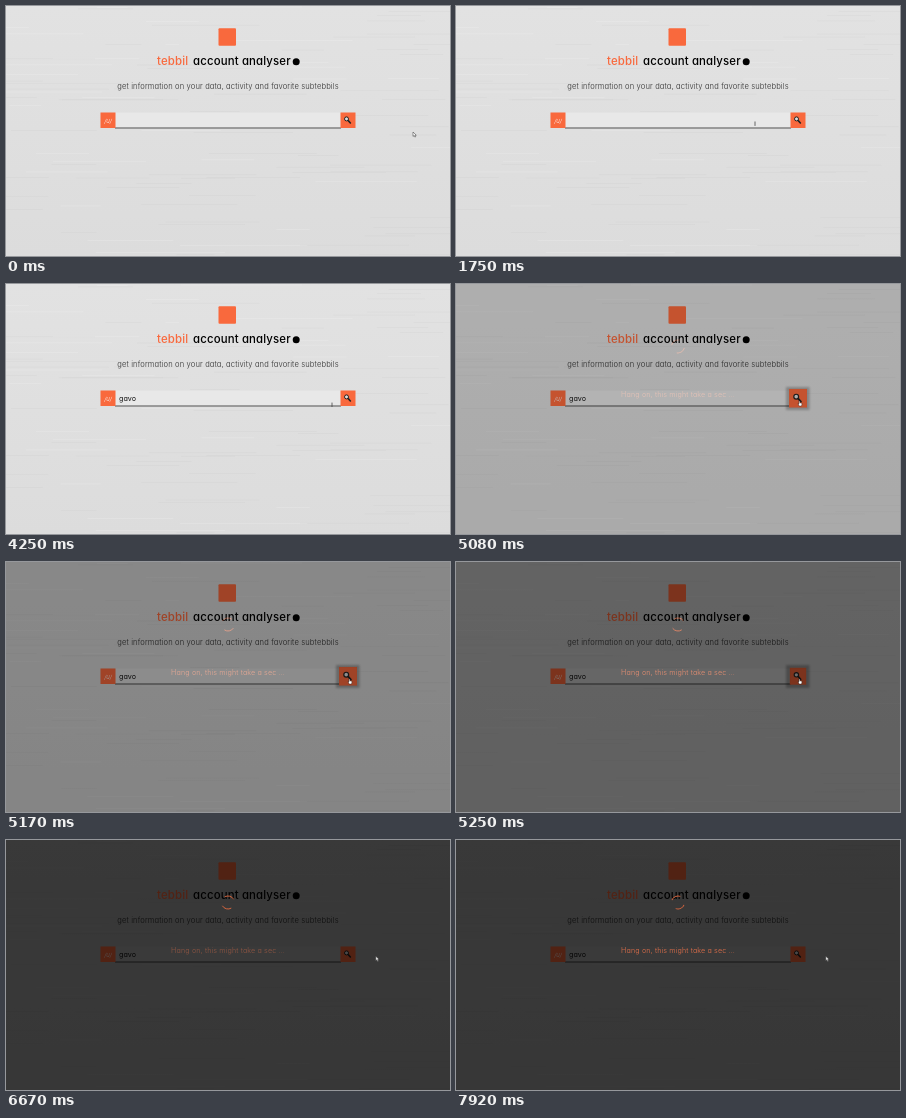
An HTML page for the animation above (8 s loop, 444x250 px).

```html
<!DOCTYPE html>
<html lang="en">
<head>
<meta charset="utf-8">
<title>account analyser</title>
<style>
html, body { margin: 0; width: 100%; height: 100%; overflow: hidden; background: #dfdfdf; }
svg { display: block; width: 100vw; height: 100vh; }
text { font-family: Inter, "Open Sans", sans-serif; font-feature-settings: "cv11"; }
.title { font-size: 11.4px; font-weight: 450; letter-spacing: .15px; }
.sub { font-size: 7.6px; font-weight: 300; letter-spacing: .13px; text-anchor: middle; fill: #333; }
.wait { font-size: 7.2px; font-weight: 300; letter-spacing: .12px; text-anchor: middle; fill: #e8714a; }
.user { font-size: 7.2px; fill: #111; }
.tag { font-size: 6px; font-style: italic; font-weight: 300; text-anchor: middle; fill: #fff; }
.orange { fill: #f9693d; }
</style>
</head>
<body>
<svg viewBox="0 0 444 250">
  <defs>
    <linearGradient id="paper" x2="0" y2="1">
      <stop stop-color="#e2e2e2"/><stop offset="1" stop-color="#dcdcdc"/>
    </linearGradient>
    <filter id="blur" x="-50%" y="-50%" width="200%" height="200%"><feGaussianBlur stdDeviation="1"/></filter>
  </defs>

  <rect width="444" height="250" fill="url(#paper)"/>
  <g id="streaks"></g>

  <text class="title" x="187" y="59.3">account analyser</text>
  <circle cx="290.2" cy="55.8" r="3.5"/>
  <text class="sub" x="222" y="83">get information on your data, activity and favorite subtebbils</text>

  <rect x="109" y="106.5" width="226" height="15" fill="#e8e8e8"/>
  <rect x="109" y="121.5" width="226" height="1" fill="#555"/>
  <text class="user" id="user" x="113" y="116.8"></text>
  <rect id="shadow" x="330" y="103" width="23.5" height="23" filter="url(#blur)"/>

  <g id="marks">
    <rect class="orange" x="212.5" y="22.3" width="17.5" height="17.5" rx="1"/>
    <text class="title orange" x="151" y="59.3">tebbil</text>
    <rect class="orange" x="94.5" y="106.5" width="15" height="15.5"/>
    <text class="tag" x="102" y="116.6">/u/</text>
    <g id="button">
      <rect class="orange" x="334.5" y="106.5" width="15" height="15.5"/>
      <path d="M342 114.4l2.4 2.6" stroke="#222" stroke-width="1.6" stroke-linecap="round"/>
      <circle cx="340.5" cy="112.9" r="2" fill="#ddd" stroke="#222"/>
    </g>
  </g>

  <g id="overlay">
    <rect width="444" height="250" opacity=".75"/>
    <use href="#marks" opacity=".1"/>
    <path id="ring" d="M217.4 57.9a6.5 6.5 0 0 1 9.2 0M226.6 67.1a6.5 6.5 0 0 1-9.2 0" fill="none" stroke="#d9663f" stroke-width=".9"/>
    <text class="wait" id="wait" x="222" y="113">Hang on, this might take a sec ...</text>
  </g>

  <g id="cursor">
    <path id="arrow" d="M0 0v4.4l1.1-.9.8 1.6.8-.4-.8-1.5h1.4z" fill="#fff" stroke="#333" stroke-width=".5"/>
    <path id="beam" d="M0-2.2v4.4" stroke="#444" stroke-width=".8"/>
    <path id="hand" d="M0-1.5v3l-1-.5 1.2 2.5h2.3l.6-2.6-2.2-.7v-1.7z" fill="#fff" stroke="#222" stroke-width=".4"/>
  </g>
</svg>
<script>
const $ = id => document.getElementById(id);
const LOOP = 8000, FPS = 12, NAME = "gavo";
// time, x, y
const PATH = [
  [1000, 407, 126], [1330, 370, 133], [1750, 299, 117.7], [3920, 299, 117.7],
  [4250, 326, 120.8], [4580, 343, 118.5], [5330, 343, 118.5], [5500, 369.8, 116.3]
];

const clamp = v => Math.max(0, Math.min(1, v));
const ease = v => .5 - Math.cos(Math.PI * clamp(v)) / 2;
const ramp = (t, from, to) => ease((t - from) / (to - from));
const show = (id, on) => $(id).setAttribute("opacity", +on);

function cursorAt(t) {
  let [, x, y] = PATH[0];
  for (let i = 1; i < PATH.length; i++) {
    const [t0, x0, y0] = PATH[i - 1], [t1, x1, y1] = PATH[i];
    const k = ramp(t, t0, t1);
    x += (x1 - x0) * k;
    y += (y1 - y0) * k;
  }
  return [x, y];
}

function addStreaks() {
  let seed = 7, out = "";
  const rnd = () => (seed = seed * 16807 % 2147483647) / 2147483647;
  for (let i = 0; i < 90; i++) {
    const color = rnd() < .5 ? "#fff" : "#bbb";
    out += `<rect x="${rnd() * 480 - 60}" y="${rnd() * 250}" width="${30 + rnd() * 100}" height=".6" fill="${color}" opacity=".22"/>`;
  }
  $("streaks").innerHTML = out;
}

function draw(now) {
  const t = Math.floor(now % LOOP * FPS / 1000 + .05) * 1000 / FPS;

  const typed = t < 2580 ? 0 : Math.floor((t - 2580) / 250) + 1;
  $("user").textContent = NAME.slice(0, typed);

  const [x, y] = cursorAt(t);
  const onButton = x > 334 && x < 350 && y < 123;
  const onInput = x > 109 && x <= 334 && y < 123;
  $("cursor").setAttribute("transform", `translate(${x} ${y})`);
  show("hand", onButton);
  show("beam", onInput);
  show("arrow", !onButton && !onInput);

  const grow = 1 + .2 * (ramp(t, 4700, 5080) - ramp(t, 5160, 5330));
  $("button").setAttribute("transform", `translate(342 114.2) scale(${grow}) translate(-342 -114.2)`);
  show("shadow", .25 * (ramp(t, 4700, 5160) - ramp(t, 5340, 5500)));

  show("overlay", ramp(t, 4870, 5440));
  show("wait", .75 + .25 * Math.cos((t - 5330) / 2600 * 2 * Math.PI));
  $("ring").setAttribute("transform", `rotate(${(t - 5210) / 1400 * 360} 222 62.5)`);
}

addStreaks();
const start = performance.now();
function tick() {
  draw(performance.now() - start);
  requestAnimationFrame(tick);
}
tick();
</script>
</body>
</html>
```
